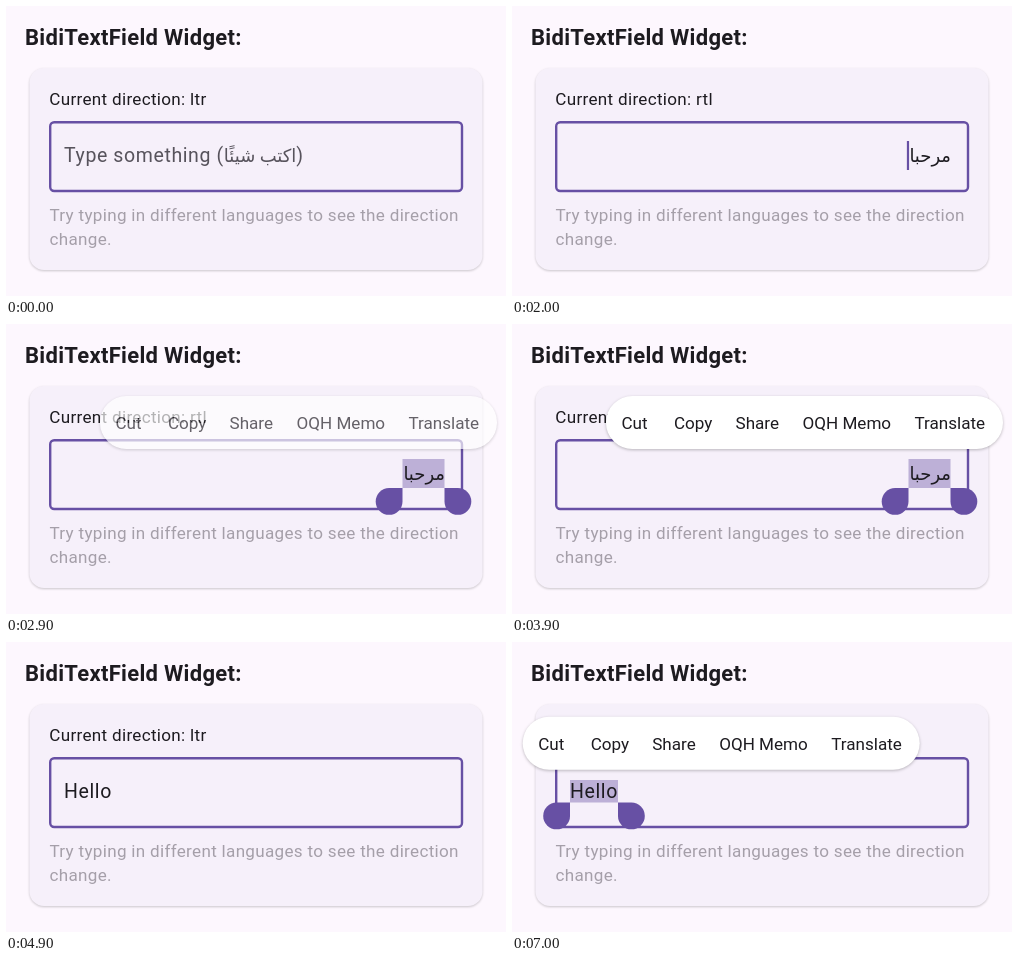
Recreate the animation shown at these times as an HTML page. Size 500 px wide and 290 px high, loop 7.1 s.

```html
<!DOCTYPE html>
<html lang="en">
<head>
<meta charset="utf-8">
<title>BidiTextField Widget</title>
<style>
  html, body { margin: 0; width: 100%; height: 100%; overflow: hidden; background: #fdf7fe; }
  svg { display: block; width: 500px; height: 290px; }
  text { font-family: Roboto, "DejaVu Sans", sans-serif; fill: #1d1b20; white-space: pre; }
  .title { font-size: 22px; font-weight: 700; letter-spacing: .3px; }
  .body { font-size: 17.08px; letter-spacing: .305px; }
  .help { fill: #a59fa9; }
  .input { font-size: 19.5px; letter-spacing: .61px; }
  .hint { fill: #57535c; }
  .arabic { font-size: 18px; letter-spacing: 0; }
  .zoomed { font-size: 22.5px; }
  .menu text { font-size: 17.08px; }
  .primary { fill: #6750a4; }
  .select { fill: #6750a4; fill-opacity: .4; }
  .card { fill: #f6f0fa; filter: drop-shadow(0 1px 1.2px rgba(0, 0, 0, .2)); }
  .pill { fill: #fff; filter: drop-shadow(0 1px 1.5px rgba(0, 0, 0, .25)); }
  .lens { fill: #f8f3fb; filter: drop-shadow(0 1px 1.5px rgba(0, 0, 0, .12)); }
</style>
</head>
<body>
<svg viewBox="0 0 500 290">
  <defs>
    <path id="drop" class="primary" d="M0 0v13.4a13.4 13.4 0 1 1-13.4-13.4z"/>
  </defs>

  <text class="title" x="19" y="38.5">BidiTextField Widget:</text>
  <rect class="card" x="23.5" y="62" width="453" height="202" rx="14.6"/>
  <text class="body" id="label" x="43.3" y="99.3"></text>
  <rect x="44.2" y="116.2" width="411.8" height="68.8" rx="4" fill="none" stroke="#6750a4" stroke-width="2.4"/>
  <text class="body help" x="43.5" y="214.5">Try typing in different languages to see the direction</text>
  <text class="body help" x="43.5" y="238.7">change.</text>

  <rect class="select" id="selection"/>
  <text class="input hint" id="hint" x="58" y="155.5">Type something (<tspan class="arabic">اكتب شيئًا</tspan>)</text>
  <text id="value" y="155.5"></text>
  <rect class="primary" id="cursor" width="2.2"/>

  <g id="handles">
    <use href="#drop" id="dropA"/>
    <use href="#drop" id="dropB"/>
  </g>

  <g id="lens">
    <rect class="lens" x="377" y="77" width="98" height="46" rx="16"/>
    <rect class="select" x="404" y="82" width="53" height="36"/>
    <text class="arabic zoomed" x="457" y="108" direction="rtl">مرحبا</text>
  </g>

  <g class="menu" id="menu">
    <rect class="pill" x="94" y="72" width="397" height="53" rx="26.5"/>
    <text x="109.5" y="105.2">Cut</text>
    <text x="162" y="105.2">Copy</text>
    <text x="223.5" y="105.2">Share</text>
    <text x="290.5" y="105.2">OQH Memo</text>
    <text x="402.5" y="105.2">Translate</text>
  </g>
</svg>
<script>
  const LOOP = 7100, STEP = 100;
  const LEFT = 58, RIGHT = 439;
  const $ = id => document.getElementById(id);

  // [start time, field text, direction]
  const typing = [
    [0, '', 'ltr'],
    [1000, 'م', 'ltr'],
    [1100, 'م', 'rtl'],
    [1300, 'مر', 'rtl'],
    [1400, 'مرح', 'rtl'],
    [1500, 'مرحب', 'rtl'],
    [1600, 'مرحبا', 'rtl'],
    [4000, 'H', 'rtl'],
    [4100, 'H', 'ltr'],
    [4200, 'He', 'ltr'],
    [4300, 'Hel', 'ltr'],
    [4400, 'Hell', 'ltr'],
    [4500, 'Hello', 'ltr']
  ];
  const cursorOn = [[100, 600], [1000, 2100], [4000, 4700], [5300, 5900]];

  const within = (t, a, b) => t >= a && t < b;
  const ramp = (t, a, b) => Math.min(1, Math.max(0, (t - a) / (b - a)));
  const set = (el, attrs) => {
    for (const k in attrs) el.setAttribute(k, attrs[k]);
  };
  const show = (id, alpha) => { $(id).style.opacity = +alpha; };

  function drawField(t) {
    const [, text, dir] = typing.filter(s => s[0] <= t).pop();
    const arabic = /[\u0600-\u06ff]/.test(text);
    const value = $('value'), rtl = dir === 'rtl';
    const x = rtl ? RIGHT : LEFT;

    $('label').textContent = 'Current direction: ' + dir;
    show('hint', !text);
    value.textContent = text;
    set(value, { x, direction: dir, class: arabic ? 'arabic' : 'input' });

    const width = text ? value.getComputedTextLength() : 0;
    set($('cursor'), {
      x: rtl ? x - width - 2.5 : x + width + .3,
      y: arabic ? 135 : 138,
      height: arabic ? 29 : 22
    });
    show('cursor', cursorOn.some(([a, b]) => within(t, a, b)));
  }

  function drawSelection(t) {
    const first = t < 5000;
    const [x1, x2, top, bottom] = first ? [396.5, 438.5, 135, 164] : [58, 106, 138, 160.5];
    set($('selection'), { x: x1, y: top, width: x2 - x1, height: bottom - top });
    show('selection', within(t, 2300, 4000) || t >= 5900);

    set($('dropA'), { transform: `translate(${x1} ${bottom})` });
    set($('dropB'), { transform: `translate(${x2} ${bottom}) scale(-1 1)` });
    const fadeIn = t < 2800 ? .85 * ramp(t, 2400, 2600) : 1;
    show('handles', first ? (t < 4000 ? fadeIn : 0) : ramp(t, 6100, 6300));

    show('lens', within(t, 2400, 2800));
    set($('menu'), { transform: first ? '' : 'translate(-83.3 2.8)' });
    show('menu', first
      ? (t < 2800 ? 0 : ramp(t, 2700, 3000) * (1 - ramp(t, 3900, 4100)))
      : ramp(t, 6100, 6400));
  }

  function frame() {
    const t = Math.floor(performance.now() % LOOP / STEP) * STEP;
    drawField(t);
    drawSelection(t);
    requestAnimationFrame(frame);
  }
  frame();
</script>
</body>
</html>
```
